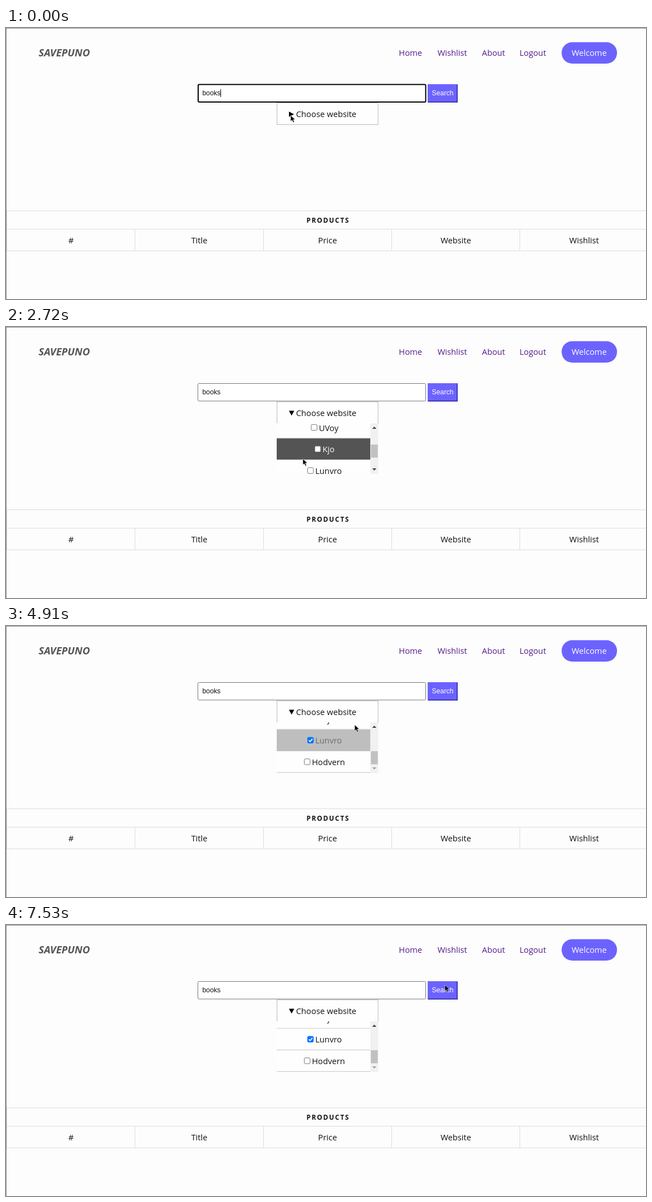
These frames come from a looping animation (1149 by 487 pixels, 8000 ms). An HTML page:

```html
<!DOCTYPE html>
<html lang="en">
<head>
<meta charset="utf-8">
<title>Shop search</title>
<style>
  html, body { margin: 0; width: 100%; height: 100%; overflow: hidden; background: #fdfdfd; }
  svg { display: block; }
  text { font: 14.72px "Open Sans", sans-serif; fill: #111; }
  .brand { font-size: 18.4px; font-weight: 700; font-style: italic; fill: #555; }
  .nav text { fill: #551a8b; }
  .caption { font-size: 11.8px; font-weight: 700; letter-spacing: 1.84px; }
  .form text { font: 12.27px "Liberation Sans", Arial, sans-serif; }
  .mid { text-anchor: middle; }
  .nav .light, .form .light { fill: #fff; }
</style>
</head>
<body>
<svg width="1149" height="487">
  <path d="M0 .5H1149M.5 0V487" stroke="#8c8c8c"/>
  <text class="brand" x="58.5" y="51.3">SAVEPUNO</text>
  <g class="nav">
    <text x="705.3" y="50.3">Home</text>
    <text x="774.7" y="50.3">Wishlist</text>
    <text x="854.6" y="50.3">About</text>
    <text x="921.9" y="50.3">Logout</text>
    <rect x="997.5" y="25.5" width="99.5" height="38.5" rx="19.2" fill="#6c63ff"/>
    <text class="light mid" x="1047" y="50.3">Welcome</text>
  </g>
  <g class="form">
    <rect id="field" fill="#fff"/>
    <text x="352.5" y="121.3">books</text>
    <path id="caret" d="M385.5 110V124" stroke="#000"/>
    <path d="M757 101H811V134H757Z" fill="#6c63ff"/>
    <path id="edgeTL" d="M757 101H811L809 103H759V132L757 134Z"/>
    <path id="edgeBR" d="M811 101V134H757L759 132H809V103Z"/>
    <text class="light mid" x="784" y="121.3">Search</text>
  </g>
  <rect x="486.5" y="134.5" width="181.5" height="39" fill="#fefefe" stroke="#b8b8b8"/>
  <path id="marker"/>
  <text x="520.8" y="160">Choose website</text>
  <svg id="list" x="486" y="173" width="182.5" height="91">
    <g id="rows"></g>
    <rect x="168" width="14.5" height="91" fill="#f1f1f1"/>
    <rect id="thumb" x="169" width="12.5" height="23.5" fill="#c1c1c1"/>
    <path id="up" d="M171.5 10H179L175.2 6Z"/>
    <path id="down" d="M171.5 81H179L175.2 85Z"/>
  </svg>
  <path id="grid" fill="none" stroke="#dcdcdc"/>
  <text class="caption mid" x="578.3" y="350">PRODUCTS</text>
  <g id="heads" class="mid"></g>
  <path id="cursor" d="M0 0V10.6L2.5 8.4 4.5 12.6 6.4 11.8 4.5 7.7 8 7.4Z" stroke="#fff" stroke-width=".5"/>
</svg>
<script>
const LOOP = 8000, ROW = 38.75, MAX_SCROLL = 141.75, PICKED = 4;
const $ = id => document.getElementById(id);
const set = (el, attrs) => { for (const k in attrs) el.setAttribute(k, attrs[k]); };
const clamp = u => Math.max(0, Math.min(1, u));
const mix = (a, b, u) => a + (b - a) * u;
const grey = v => `rgb(${[v, v, v].map(Math.round)})`;
const smooth = u => u * u * (3 - 2 * u);
const easeOut = u => 1 - (1 - u) ** 2;

const ticks = [0, 280, 560, 710, 860, 1030, 1410, 1540, 1660, 1810, 2080, 2200, 2320, 2450,
  2570, 2720, 3120, 3270, 3390, 3520, 3670, 3790, 4050, 4300, 4670, 4790, 4920, 5040, 5150,
  5300, 5450, 5600, 5750, 6650, 6770, 6890, 7010, 7410, 7530];

// Pointer moves: start, end, x, y
const moves = [[1380, 1405, 543, 190], [1540, 1760, 571, 225], [2460, 2570, 547, 228],
  [2580, 2720, 533, 237], [3530, 3670, 546, 203], [4560, 5150, 783, 128],
  [5160, 5300, 774, 147], [5310, 5450, 609, 203], [5460, 5600, 609, 207],
  [6560, 7010, 788, 108]];

// Hovered row from each moment on, -1 for none
const hovers = [[0, -1], [1386, 0], [1661, 1], [2330, 3], [3306, 5], [3580, 4],
  [4700, -1], [5451, 4], [6600, -1]];

// Shop name and left edge of its checkbox
const shops = [["Zurelo", 50.5], ["Finkoby", 50.5], ["UVoy", 61.5], ["Kjo", 68],
  ["Lunvro", 55], ["Hodvern", 49]];

$("rows").innerHTML = shops.map(([name, x], i) => `<g transform="translate(0 ${i * ROW})">
  <rect width="168" height="${ROW}"/>
  <rect y="${ROW - 1}" width="168" height="1" fill="#c4c4c4"/>
  <rect x="${x + .5}" y="13.8" width="10.4" height="10.4" rx="1.8"/>
  <path d="M${x + 2.7} 19.2l2.2 2.3 4.2-4.9" fill="none" stroke="#fff" stroke-width="1.7"/>
  <text x="${x + 14.2}" y="25.2">${name}</text></g>`).join("");
const rows = [...$("rows").children].map(g => g.children);

$("heads").innerHTML = ["#", "Title", "Price", "Website", "Wishlist"].map((s, i) =>
  `<text x="${116.7 + i * 230.3}" y="387">${s}</text>`).join("");
set($("grid"), { d: "M1 328.5H1149M1 361.5H1149M1 400.5H1149M1.5 328V400" +
  [231.5, 462.5, 692.5, 922.5].map(x => `M${x} 361V400`).join("") });

function pointer(t) {
  let x = 511, y = 157;
  for (const [a, b, tx, ty] of moves) {
    const u = smooth(clamp((t - a) / (b - a)));
    x = mix(x, tx, u);
    y = mix(y, ty, u);
  }
  return `translate(${x} ${y})`;
}

function hoverLevel(row, t) {
  const i = hovers.findLastIndex(h => h[0] <= t);
  const u = clamp((t - hovers[i][0]) / 200);
  // Close to the CSS "ease" curve
  const p = 1 - (1 - u) ** 2.2 * (1 + .9 * u);
  return hovers[i][1] === row ? p : i && hovers[i - 1][1] === row ? 1 - p : 0;
}

function drawRow([back, , box, check, label], i, t) {
  const level = hoverLevel(i, t);
  const checked = i === PICKED && t >= 4300;
  const pressed = i === PICKED && t >= 4050 && !checked;
  const blue = level > .5 ? "#005cc8" : "#0075ff";
  set(back, { fill: grey(mix(254, 84, level)) });
  set(box, { fill: checked ? blue : "#fff", stroke: checked ? blue : pressed ? "#b5b5b5" : "#767676" });
  set(check, { visibility: checked ? "inherit" : "hidden" });
  label.style.fill = grey(mix(17, 255, level));
}

function draw(t) {
  const focused = t < 560, open = t >= 860, pressed = t >= 7410 && t < 7530;
  set($("field"), focused
    ? { x: 345, y: 101.5, width: 408.5, height: 31.5, rx: 2, stroke: "#000", "stroke-width": 2 }
    : { x: 344.5, y: 101.5, width: 409, height: 31.5, rx: 2, stroke: "#767676", "stroke-width": 1 });
  set($("caret"), { visibility: t < 280 ? "visible" : "hidden" });
  set($("edgeTL"), { fill: pressed ? "#4039b5" : "#6c63ff" });
  set($("edgeBR"), { fill: pressed ? "#6c63ff" : "#4039b5" });
  set($("marker"), { d: t < 710 ? "M508 150.3L517 155 508 159.7Z" : "M508 150.5H517.5L512.7 159.3Z" });

  const scroll = 89 * easeOut(clamp((t - 2060) / 330)) +
    (MAX_SCROLL - 89) * easeOut(clamp((t - 3100) / 200));
  set($("list"), { visibility: open ? "visible" : "hidden" });
  set($("rows"), { transform: `translate(0 ${-scroll})` });
  set($("thumb"), { y: 15 + 37 * scroll / MAX_SCROLL });
  set($("up"), { fill: scroll > 0 ? "#404040" : "#a3a3a3" });
  set($("down"), { fill: scroll < MAX_SCROLL ? "#404040" : "#a3a3a3" });
  rows.forEach((row, i) => drawRow(row, i, t));
  set($("cursor"), { transform: pointer(t) });
}

const start = performance.now();
function loop() {
  const t = (performance.now() - start) % LOOP;
  draw(ticks.findLast(tick => tick <= t));
  requestAnimationFrame(loop);
}
loop();
</script>
</body>
</html>
```
